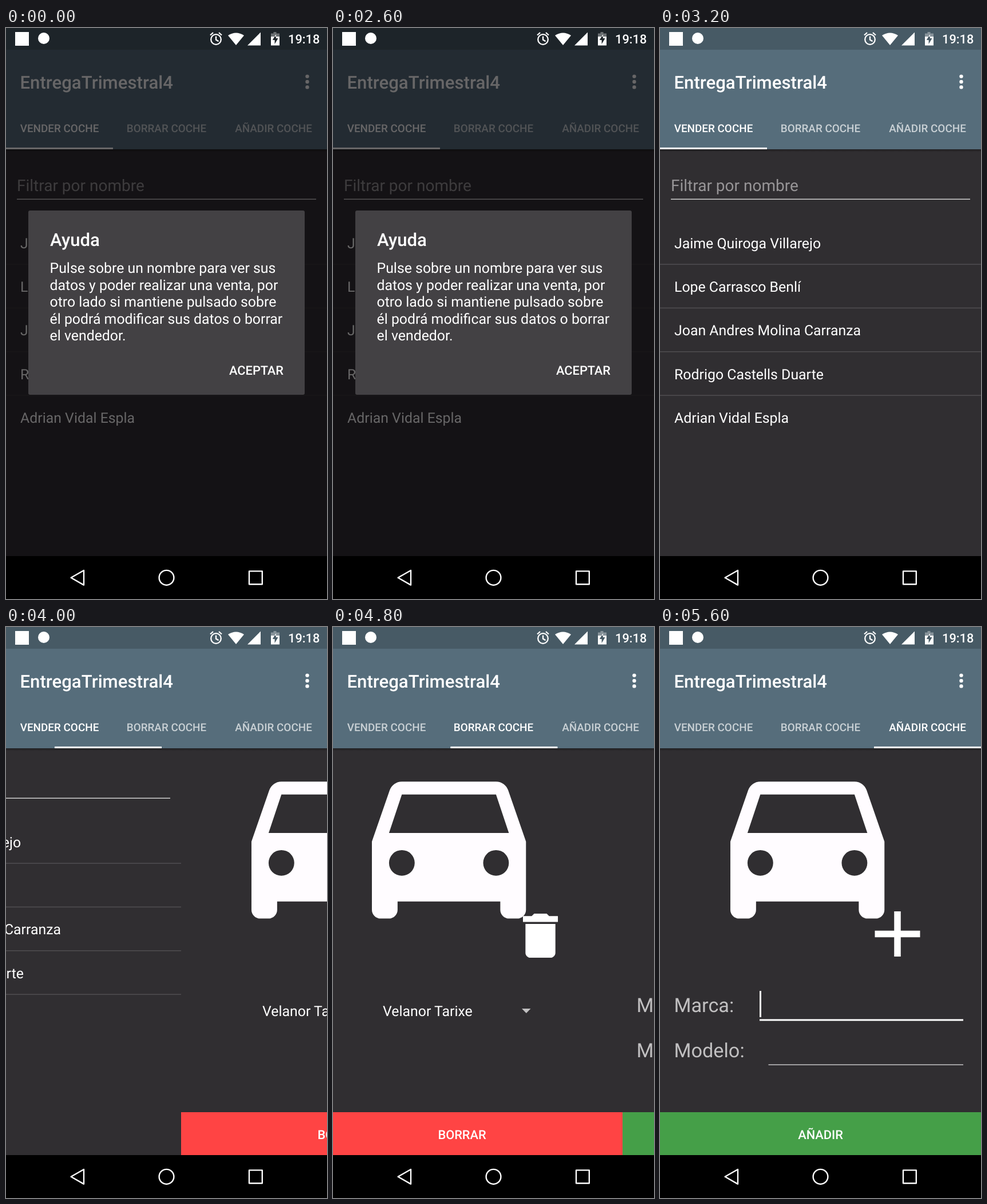
An HTML page for the animation above (6100 ms loop, 561 by 998 pixels).

```html
<!DOCTYPE html>
<html lang="es">
<head>
<meta charset="utf-8">
<style>
  html, body { margin: 0; width: 100%; height: 100%; overflow: hidden; background: #000; }
  svg { display: block; width: 561px; height: 998px; font: 24.85px Roboto, sans-serif; fill: #fff; text-rendering: geometricPrecision; }
  .medium { font-weight: 500; }
  .title { font-size: 31.16px; font-weight: 500; }
  .button { font-size: 21.8px; font-weight: 500; text-anchor: middle; }
  .tab { font-size: 18.9px; font-weight: 500; text-anchor: middle; }
  .hint { font-size: 28px; fill: #979597; }
  .label { font-size: 34.3px; fill: #c1c0c1; }
  .line { fill: none; stroke: #fff; }
</style>
</head>
<body>
<svg viewBox="0 0 561 998">
  <defs>
    <linearGradient id="shade" x2="0" y2="1">
      <stop stop-opacity=".35"/><stop offset="1" stop-opacity="0"/>
    </linearGradient>
    <path id="car" fill="#fffcff" transform="translate(78.1 195.4) scale(14.96)" fill-rule="evenodd" d="M18.92 6.01C18.72 5.42 18.16 5 17.5 5h-11c-.66 0-1.21.42-1.42 1.01L3 12v8c0 .55.45 1 1 1h1c.55 0 1-.45 1-1v-1h12v1c0 .55.45 1 1 1h1c.55 0 1-.45 1-1v-8zM5 14.5a1.5 1.5 0 0 0 3 0a1.5 1.5 0 0 0-3 0zM16 14.5a1.5 1.5 0 0 0 3 0a1.5 1.5 0 0 0-3 0zM5 11l1.5-4.5h11L19 11z"/>
  </defs>

  <rect width="561" height="923" fill="#302e31"/>

  <g id="pages">
    <text class="hint" x="19" y="285">Filtrar por nombre</text>
    <rect x="19" y="298.5" width="523" height="1.5" fill="#d0cfd0"/>
    <g id="sellers"></g>
    <g id="dividers" fill="#504e51"></g>
    <g transform="translate(561)">
      <use href="#car"/>
      <path transform="translate(365.2 488.2) scale(4.36 4.28)" d="M6 19c0 1.1.9 2 2 2h8c1.1 0 2-.9 2-2V7.2H6zM19 4h-3.5l-1-1h-5l-1 1H5v2.4h14z"/>
      <text x="142" y="680">Velanor Tarixe</text>
      <path d="M385 667h15.5l-7.75 8z" fill="#c1c0c1"/>
      <rect y="848" width="561" height="75" fill="#ff4444"/>
      <text class="button" x="280.5" y="894.5">BORRAR</text>
    </g>
    <g transform="translate(1122)">
      <use href="#car"/>
      <path d="M375.5 536.5h79M415 497v79" class="line" stroke-width="11.5"/>
      <text class="label" x="24.5" y="673">Marca:</text>
      <text class="label" x="24.5" y="752">Modelo:</text>
      <rect id="brandLine" x="174" width="356"/>
      <rect id="caret" x="174" y="636" width="3" height="46"/>
      <rect x="189.5" y="764.4" width="340.5" height="1.4" fill="#d0cfd0"/>
      <rect y="848" width="561" height="75" fill="#459f48"/>
      <text class="button" x="280.5" y="894.5">AÑADIR</text>
    </g>
  </g>

  <rect width="561" height="212" fill="#566d7b"/>
  <rect width="561" height="38" fill="#475a65"/>
  <rect y="212" width="561" height="5" fill="url(#shade)"/>
  <text class="title" x="24.5" y="106">EntregaTrimestral4</text>
  <circle cx="526.5" cy="84.6" r="3.2"/>
  <circle cx="526.5" cy="94" r="3.2"/>
  <circle cx="526.5" cy="103.4" r="3.2"/>
  <g id="tabs"></g>
  <rect id="marker" y="208.9" width="187" height="3.1"/>

  <rect id="dim" width="561" height="923" fill="#030003"/>

  <!-- status bar -->
  <rect x="16" y="7" width="24" height="24"/>
  <circle cx="66" cy="18" r="10"/>
  <g class="line" stroke-width="2.3">
    <circle cx="367" cy="20" r="8.8"/>
    <path d="M367 14.5v6l4.5 2.8M357 12.5l5-4.5M377 12.5l-5-4.5"/>
  </g>
  <path d="M402 30L388 13Q402 4 416 13zM422 30.5h23v-23z"/>
  <path d="M467.5 7h5v2.5h5.5V15h-15V9.5h4.5z" opacity=".35"/>
  <path fill-rule="evenodd" d="M463 15h15v15.5h-15zM471.8 11l-6 10h3.8v7l6-10h-3.8z"/>
  <text class="medium" x="493" y="27.3" font-size="21.8">19:18</text>

  <!-- navigation bar -->
  <rect y="923" width="561" height="75" fill="#000"/>
  <g class="line" stroke-width="2.4" stroke-linejoin="round">
    <path d="M113.6 960.8L136 948v25.6z"/>
    <circle cx="280.5" cy="960.8" r="12.9"/>
    <rect x="425" y="949.4" width="22.8" height="22.8"/>
  </g>

  <g id="dialog">
    <rect x="39" y="319" width="483" height="322" rx="3" fill="#434144"/>
    <text class="title" x="77" y="380.5">Ayuda</text>
    <text class="button" x="437.5" y="605.8">ACEPTAR</text>
  </g>
</svg>
<script>
  const LOOP = 6100, STEP = 100, PAGE = 561;
  const $ = id => document.getElementById(id);

  function add(parent, tag, attrs, text = '') {
    const el = document.createElementNS('http://www.w3.org/2000/svg', tag);
    for (const key in attrs) el.setAttribute(key, attrs[key]);
    el.textContent = text;
    $(parent).append(el);
    return el;
  }

  ['Jaime Quiroga Villarejo', 'Lope Carrasco Benlí', 'Joan Andres Molina Carranza',
   'Rodrigo Castells Duarte', 'Adrian Vidal Espla'].forEach((name, i) => {
    const y = 384.5 + i * 76.35;
    add('sellers', 'text', { x: 25, y }, name);
    if (i < 4) add('dividers', 'rect', { y: y + 27.8, width: PAGE, height: 1.5 });
  });

  ['Pulse sobre un nombre para ver sus', 'datos y poder realizar una venta, por',
   'otro lado si mantiene pulsado sobre', 'él podrá modificar sus datos o borrar',
   'el vendedor.'].forEach((line, i) =>
    add('dialog', 'text', { x: 76.5, y: 428 + i * 29.6 }, line));

  const tabs = ['VENDER COCHE', 'BORRAR COCHE', 'AÑADIR COCHE'].map((name, i) =>
    add('tabs', 'text', { class: 'tab', x: 93.5 + i * 187, y: 181.5 }, name));

  // [time, value] points
  const fade = [[2600, 1], [2700, .7], [2800, .25], [2900, 0]];
  const scroll = [[3700, 0], [3800, 55], [4000, 255], [4100, 385], [4200, 475], [4300, 527],
    [4400, 550], [4500, 559], [4600, 561], [4700, 561], [4800, 616], [4900, 750], [5000, 900],
    [5100, 1025], [5200, 1092], [5300, 1111], [5400, 1118], [5500, 1121], [5600, 1122]];

  function valueAt(points, t) {
    const i = points.findIndex(p => p[0] >= t);
    if (i < 0) return points[points.length - 1][1];
    if (i === 0) return points[0][1];
    const [t0, a] = points[i - 1], [t1, b] = points[i];
    return a + (b - a) * (t - t0) / (t1 - t0);
  }

  function draw(now) {
    // the screen refreshes ten times a second
    const t = Math.floor(now % LOOP / STEP) * STEP;
    const x = valueAt(scroll, t), shown = valueAt(fade, t), focused = t >= 5600;
    $('pages').setAttribute('transform', `translate(${-x})`);
    $('marker').setAttribute('x', x / 3);
    tabs.forEach((tab, i) => tab.setAttribute('opacity', i === Math.round(x / PAGE) ? 1 : .68));
    $('dim').setAttribute('opacity', shown * .6);
    $('dividers').setAttribute('opacity', 1 - shown * .7);
    $('dialog').setAttribute('opacity', shown);
    $('caret').setAttribute('opacity', +focused);
    $('brandLine').setAttribute('y', focused ? 685.4 : 685.6);
    $('brandLine').setAttribute('height', focused ? 3 : 1.4);
    $('brandLine').setAttribute('fill', focused ? '#fff' : '#d0cfd0');
    requestAnimationFrame(() => draw(performance.now()));
  }
  draw(performance.now());
</script>
</body>
</html>
```
